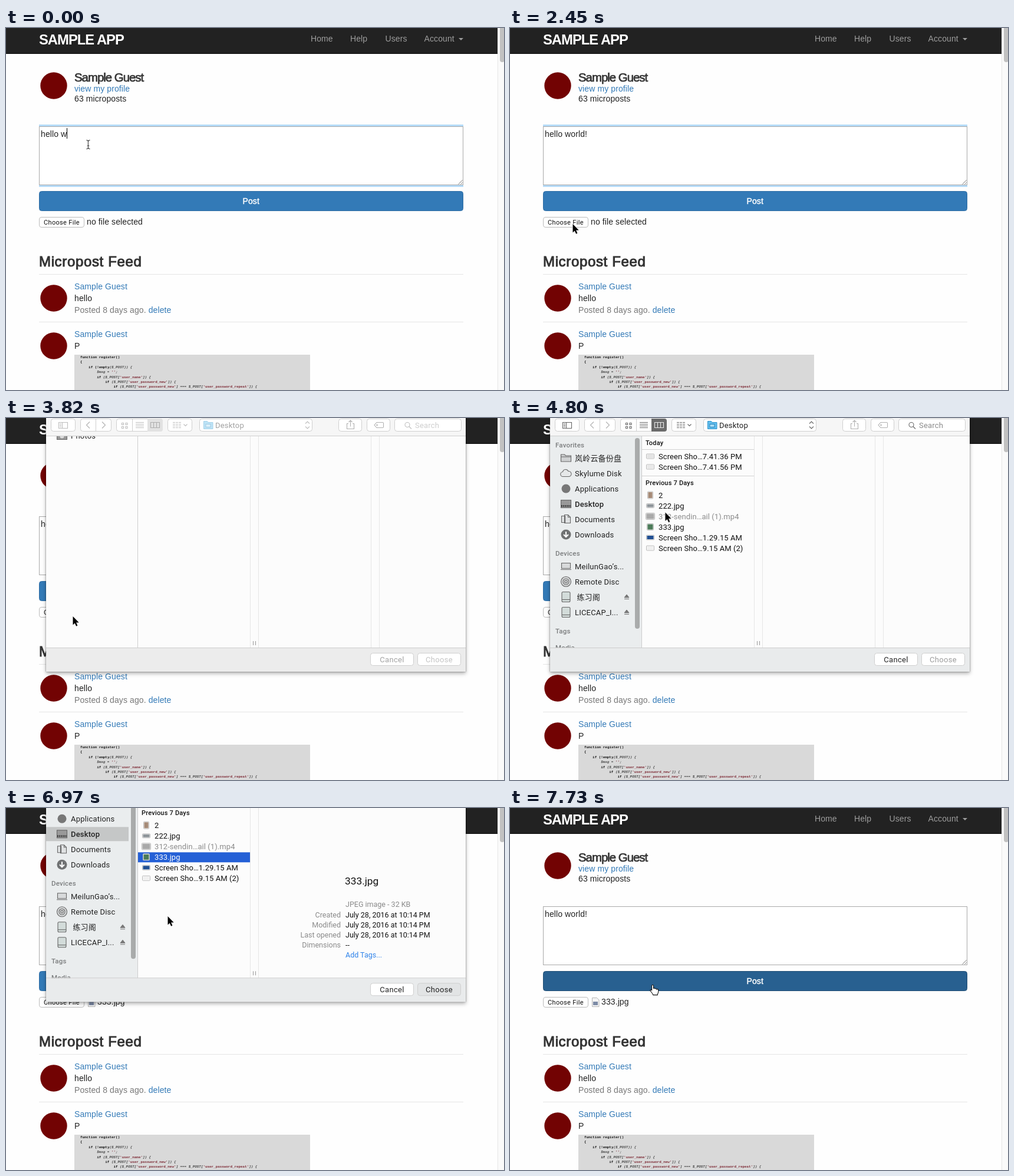
These frames come from a looping animation (845x615 px, 8000 ms). An HTML page:

```html
<!DOCTYPE html>
<html lang="en">
<head>
<meta charset="utf-8">
<title>Micropost upload</title>
<style>
html, body { margin: 0; width: 100%; height: 100%; overflow: hidden; background: #fff; }
svg { display: block; width: 845px; height: 615px; }
text { white-space: pre; }
.page text { font: 14px "Liberation Sans", Arial, sans-serif; letter-spacing: .1px; fill: #222; }
.page .brand { font-size: 23.8px; font-weight: bold; letter-spacing: -1px; fill: #fff; }
.page .nav text { fill: #9d9d9d; }
.page .name { font-size: 20.4px; letter-spacing: -1px; fill: #333; stroke: #333; stroke-width: .7px; }
.page .feed { font-size: 24px; letter-spacing: .65px; fill: #333; stroke: #333; stroke-width: 1px; }
.page .link { fill: #337ab7; }
.page .dim { fill: #777; }
.page .post { fill: #fff; stroke: #fff; stroke-width: .4px; }
.page .btn { font: 11px Roboto, sans-serif; letter-spacing: .33px; fill: #111; }
.page .code text { font: italic bold 5.9px "Liberation Mono", monospace; letter-spacing: 0; fill: #444; }
.code tspan { font-style: normal; fill: #111; }
.code .str { fill: #7d2a35; }

.sheet text { font: 13px Roboto, "Noto Sans CJK SC", sans-serif; letter-spacing: .2px; fill: #222; }
.sheet .files text { letter-spacing: .07px; fill: #111; }
.sheet .files .head, .sheet .side .head { font-size: 11px; font-weight: 500; letter-spacing: .2px; }
.sheet .side .head { font-size: 11.5px; fill: #7b7d7e; }
.sheet .files .off { fill: #8c8c8c; }
.sheet .info text { font-size: 12.5px; letter-spacing: 0; fill: #111; }
.sheet .info .big { font-size: 17.3px; }
.sheet .info .key { fill: #8a8a8a; }
.sheet .info .blue { fill: #2f83ea; }
.sheet .key { text-anchor: end; }
.sheet .label { letter-spacing: .3px; text-anchor: middle; }
.box { fill: #fff; stroke: #cfcfcf; }
.ico { fill: none; stroke: #666; stroke-width: 1.1; }
.faint { opacity: .5; }
.shadow { filter: drop-shadow(0 0 1px rgba(0,0,0,.45)) drop-shadow(0 3px 3px rgba(0,0,0,.3)); }

.step { animation: 8s step-end infinite; }
.type { animation-name: type; }
.caret { animation-name: caret; }
.ring { animation-name: ring; }
.press { animation-name: press; }
.hover { animation-name: hover; }
.empty { animation-name: empty; }
.picked { animation-name: picked; }
.wake { animation-name: wake; }
.view { animation-name: view; }
.cols { animation-name: cols; }
.idle { animation-name: idle; }
.ready { animation-name: ready; }
.select { animation-name: select; }
.preview { animation-name: preview; }
.bar { animation-name: bar; }
.enable { animation-name: enable; }
.sel-text { animation-name: sel-text; }
.push { animation-name: push; }
.beam { animation-name: beam; }
.hand { animation-name: hand; }
.arrow { animation-name: arrow; }
.sheet { animation: slide 8s infinite; }
.cursor { animation: move 8s infinite; }

@keyframes type {
  0% { transform: translateX(103px); }
  1.5% { transform: translateX(111px); }
  2.5% { transform: translateX(116px); }
  7% { transform: translateX(119px); }
  9.125% { transform: translateX(127px); }
  21.125%, 100% { transform: translateX(140px); }
}
@keyframes caret { 0% { visibility: visible; } 15.125%, 100% { visibility: hidden; } }
@keyframes ring { 0% { visibility: visible; } 32.125%, 100% { visibility: hidden; } }
@keyframes press { 0% { fill: #fff; } 32.125% { fill: #dcdcdc; } 32.75%, 100% { fill: #fff; } }
@keyframes hover {
  0%, 28% { fill: #337ab7; stroke: #2e6da4; }
  26.35%, 95.5%, 100% { fill: #286090; stroke: #204d74; }
}
@keyframes empty { 0% { visibility: visible; } 85.625%, 100% { visibility: hidden; } }
@keyframes picked { 0% { visibility: hidden; } 85.625%, 100% { visibility: visible; } }
@keyframes wake { 0% { opacity: .42; } 48.875%, 100% { opacity: 1; } }
@keyframes view { 0% { fill: #e2e2e2; } 48.875%, 100% { fill: #6b6b6b; } }
@keyframes cols { 0% { stroke: #666; } 48.875%, 100% { stroke: #e9e9e9; } }
@keyframes idle { 0% { visibility: visible; } 48.875%, 100% { visibility: hidden; } }
@keyframes ready { 0% { visibility: hidden; } 48.875%, 100% { visibility: visible; } }
@keyframes select { 0% { visibility: hidden; } 82%, 100% { visibility: visible; } }
@keyframes preview { 0% { visibility: hidden; } 83.5%, 100% { visibility: visible; } }
@keyframes bar { 0% { fill: #dadada; } 45.5% { fill: #ececec; } 48.875%, 100% { fill: #e9ebec; } }
@keyframes enable { 0% { fill: #c4c4c4; } 48.875% { fill: #9c9c9c; } 82%, 100% { fill: #222; } }
@keyframes sel-text { 0% { fill: #111; } 82%, 100% { fill: #fff; } }
@keyframes push { 0% { fill: #fff; } 85.625%, 100% { fill: #e2e4e5; } }
@keyframes beam { 0%, 93.125% { visibility: visible; } 26.1%, 95.5%, 100% { visibility: hidden; } }
@keyframes hand { 0%, 28% { visibility: hidden; } 26.1%, 95.5%, 100% { visibility: visible; } }
@keyframes arrow { 0%, 93.125%, 100% { visibility: hidden; } 28% { visibility: visible; } }
@keyframes slide {
  0%, 40.88% { transform: translateY(-455px); animation-timing-function: ease-in-out; }
  45.375%, 85.715% { transform: translateY(0); animation-timing-function: ease-in-out; }
  90.06%, 100% { transform: translateY(-455px); }
}
@keyframes move {
  0%, 21.125% { transform: translate(139.5px, 198px); animation-timing-function: ease-in-out; }
  30.625%, 36.5% { transform: translate(106px, 333px); animation-timing-function: ease-out; }
  41%, 47.75% { transform: translate(113px, 337px); animation-timing-function: ease-in-out; }
  57.125%, 57.875% { transform: translate(233px, 191px); animation-timing-function: ease-in; }
  60.5% { transform: translate(275px, 148px); animation-timing-function: ease-out; }
  62.875%, 68.875% { transform: translate(304px, 159px); animation-timing-function: ease-in-out; }
  73.125%, 75.375% { transform: translate(277px, 150px); animation-timing-function: linear; }
  76.75% { transform: translate(275px, 178px); animation-timing-function: ease-out; }
  79%, 93.125% { transform: translate(274px, 184px); animation-timing-function: ease-in-out; }
  96.625%, 100% { transform: translate(242px, 301px); }
}
</style>
</head>
<body>
<svg viewBox="0 0 845 615" xmlns="http://www.w3.org/2000/svg">
  <g class="page">
    <rect width="845" height="615" fill="#fefefe"/>
    <rect width="834" height="44" fill="#222"/>
    <rect y="43" width="834" height="1" fill="#080808"/>
    <text class="brand" x="56" y="28">SAMPLE APP</text>
    <g class="nav">
      <text x="517" y="23">Home</text>
      <text x="584" y="23">Help</text>
      <text x="643.5" y="23">Users</text>
      <text x="709.5" y="23">Account</text>
      <path d="M768 17h8l-4 4z" fill="#9d9d9d"/>
    </g>
    <rect x="834" width="11" height="615" fill="#fafafa"/>
    <rect x="834" width="1" height="615" fill="#e6e6e6"/>
    <rect x="838" y="-10" width="8" height="68" rx="4" fill="#c1c1c1"/>

    <g fill="#720303">
      <circle cx="81" cy="98" r="22.7"/>
      <circle cx="81" cy="459" r="22.7"/>
      <circle cx="81" cy="540" r="22.7"/>
    </g>
    <text class="name" x="116" y="91">Sample Guest</text>
    <text class="link" x="116" y="108">view my profile</text>
    <text x="116" y="125">63 microposts</text>

    <rect class="step ring" x="56" y="164" width="720" height="106" fill="#b5dbf8"/>
    <rect x="56.5" y="167.5" width="719" height="99" fill="#fff" stroke="#a9a9a9"/>
    <path d="M767.5 265.5l7-7M771.5 265.5l3-3" stroke="#777"/>
    <text x="59" y="185">hello world!</text>
    <g class="step type">
      <rect y="170" width="50" height="18" fill="#fff"/>
      <rect class="step caret" y="170" width="1" height="18" fill="#000"/>
    </g>

    <rect class="step hover" x="56.5" y="277.5" width="719" height="33" rx="4"/>
    <text class="post" x="401.5" y="299">Post</text>
    <rect class="step press" x="56.5" y="321.5" width="76" height="17" rx="3.5" stroke="#bcbcbc"/>
    <text class="btn" x="64" y="334">Choose File</text>
    <text class="step empty" x="137" y="334">no file selected</text>
    <g class="step picked">
      <path d="M139.5 322.5h8l3.5 3.5v11.5h-11.5z" fill="#f4f4f4" stroke="#b5b5b5"/>
      <rect x="141" y="329" width="8" height="6" fill="#7d8ba6"/>
      <text x="155" y="334">333.jpg</text>
    </g>

    <text class="feed" x="56" y="405">Micropost Feed</text>
    <path d="M56 418.5h720M56 499.5h720" stroke="#e5e5e5"/>
    <text class="link" x="116" y="444">Sample Guest</text>
    <text x="116" y="464">hello</text>
    <text class="dim" x="116" y="484">Posted 8 days ago. <tspan class="link">delete</tspan></text>
    <text class="link" x="116" y="525">Sample Guest</text>
    <text x="116" y="545">P</text>
    <rect x="116" y="555" width="400" height="60" fill="#d9d9d9"/>
    <g class="code" id="code"></g>
  </g>

  <g class="sheet">
    <rect class="shadow" x="68" y="-30" width="712" height="461" fill="#f6f6f6"/>
    <rect x="68" y="31" width="712" height="360" fill="#fcfcfc"/>
    <g class="step idle">
      <rect x="86.5" y="26.5" width="17" height="10" fill="#999" stroke="#666"/>
      <circle cx="95" cy="31" r="3.5" fill="#ddd"/>
      <text x="110" y="35">Photos</text>
    </g>
    <g class="step ready">
      <rect x="68" y="31" width="155" height="360" fill="#eaedee"/>
      <rect class="step picked" x="68" y="134" width="140" height="24" fill="#c5c7c7"/>
      <rect x="212" y="34" width="8" height="324" rx="4" fill="#a9abab"/>
      <g class="side" id="side"></g>
      <path d="M224 53.5h190M224 98.5h190" stroke="#d2d2d2"/>
      <rect class="step select" x="224" y="177" width="190" height="17" fill="#2460d6"/>
      <g class="files" id="files"></g>
    </g>
    <path d="M223.5 31v360" stroke="#cdcdcd"/>
    <path d="M414.5 31v360M428.5 31v360M619.5 31v360M633.5 31v360" stroke="#e6e6e6"/>
    <path d="M419.5 379v7M423.5 379v7" stroke="#999"/>
    <g class="step preview">
      <rect x="429" y="31" width="351" height="360" fill="#fcfcfc"/>
      <g class="info" id="info"></g>
    </g>

    <rect x="68" y="-30" width="712" height="60" fill="#f6f6f6"/>
    <path d="M68 30.5h712" stroke="#cfcfcf"/>
    <g class="box">
      <rect x="76.5" y="1.5" width="41" height="21" rx="4"/>
      <rect x="126.5" y="1.5" width="52" height="21" rx="4"/>
      <rect x="187.5" y="1.5" width="78" height="21" rx="4"/>
      <rect x="274.5" y="1.5" width="41" height="21" rx="4"/>
      <rect x="328.5" y="1.5" width="191" height="21" rx="4"/>
      <rect x="564.5" y="1.5" width="39" height="21" rx="4"/>
      <rect x="612.5" y="1.5" width="39" height="21" rx="4"/>
      <rect x="659.5" y="1.5" width="113" height="21" rx="4"/>
      <path d="M152.5 2v20M214.5 2v20"/>
    </g>
    <path class="step view" d="M240 1h22a4 4 0 0 1 4 4v14a4 4 0 0 1-4 4h-22z"/>
    <g class="ico faint">
      <path d="M142 6.5l-5.5 5.5l5.5 5.5M163 6.5l5.5 5.5l-5.5 5.5"/>
      <path d="M581 9.5h-2.5v9h12v-9h-2.5M584.5 14.5v-10M581.5 7l3-3l3 3"/>
      <path d="M629 7.5h10a1.5 1.5 0 0 1 1.5 1.5v6a1.5 1.5 0 0 1-1.5 1.5h-10l-4-4.5z"/>
      <circle cx="629.5" cy="12" r=".8"/>
    </g>
    <g class="step wake">
      <g class="ico">
        <path d="M89.5 7.5h15v10h-15zM95.5 7.5v10M91 10h3M91 12.5h3M91 15h3"/>
        <path d="M196.5 8.5h3v3h-3zM203 8.5h3v3h-3zM196.5 14.5h3v3h-3zM203 14.5h3v3h-3z"/>
        <path d="M220 7.5h14M220 10.5h14M220 13.5h14M220 16.5h14"/>
        <path d="M283 7.5h14M283 10.5h14M283 13.5h14M283 16.5h14" stroke-dasharray="4 1"/>
        <path d="M301.5 10.5l3 3l3-3M508 9.5l3.5-3.5l3.5 3.5M508 14.5l3.5 3.5l3.5-3.5"/>
        <circle cx="681" cy="11.5" r="4"/><path d="M684 14.5l4 4"/>
        <path class="step cols" d="M245.5 7.5h15v9h-15zM250.5 7.5v9M255.5 7.5v9"/>
      </g>
      <path d="M335.5 5.5h6l1.5 2h8v11h-15.5z" fill="#62bdec" stroke="#2c93cc"/>
      <rect x="339" y="10.5" width="8" height="5" fill="#a8dcf5" stroke="#2484bd"/>
      <text x="355" y="17">Desktop</text>
      <text x="694" y="17" style="fill:#8a8a8a">Search</text>
    </g>

    <rect class="step bar" x="68" y="391" width="712" height="40"/>
    <path d="M68 390.5h712" stroke="#cdcdcd"/>
    <rect class="box" x="618.5" y="399.5" width="73" height="21" rx="4"/>
    <rect class="box step push" x="698.5" y="399.5" width="73" height="21" rx="4"/>
    <g class="step wake"><text class="label" x="655" y="415">Cancel</text></g>
    <text class="label step enable" x="735" y="415">Choose</text>
  </g>

  <g class="cursor">
    <path class="step beam" d="M-3-7.5q3 0 3 2q0-2 3-2M0-5.5v11M-3 7.5q3 0 3-2q0 2 3 2M-1.5 2h3" fill="none" stroke="#111"/>
    <path class="step arrow" d="M.5 0v14.5l3.3-3.1l2.3 5.4l2.3-1l-2.3-5.2h4.6z" fill="#000" stroke="#fff" stroke-width="1.8" paint-order="stroke"/>
    <path class="step hand" d="M-1.4 1C-1.4-.9 1.5-.9 1.5 1V6C1.7 4.6 4.2 4.8 4.2 6.4C4.6 5.4 6.9 5.6 6.9 7.2C7.5 6.4 9.8 6.8 9.8 8.4V11C9.8 13 8.3 14 8.3 16.6H.8C.6 14.5-2.5 12-3.8 9.6C-4.6 7.8-2.5 7-1.4 9Z" fill="#fff" stroke="#111" stroke-width="1.1"/>
  </g>
</svg>
<script>
const fill = (id, parts) => document.getElementById(id).innerHTML = parts.join('');
const label = (x, y, s, cls = '') => `<text class="${cls}" x="${x}" y="${y}">${s}</text>`;

// Code picture: indent level and text per line
const lines = [
  [0, '<tspan>function register()</tspan>'],
  [0, '<tspan>{</tspan>'],
  [1, '<tspan>if (!empty</tspan>($_POST)) {'],
  [2, "$msg = '';"],
  [2, "<tspan>if</tspan> ($_POST['user_name']) {"],
  [3, "<tspan>if</tspan> ($_POST['user_password_new']) {"],
  [4, "<tspan>if</tspan> ($_POST['user_password_new'] === $_POST['user_password_repeat']) {"]
];
const tint = s => s.replace(/'[^']*'/g, q => `<tspan class="str">${q}</tspan>`);
fill('code', lines.map(([n, s], i) => label(126 + 14.1 * n, 561 + 8.4 * i, tint(s))));

const icons = {
  folder: '<path d="M-8.5-6h6l2 2h9v10h-17zM-8.5-2h17" fill="#cfd1d2"/>',
  cloud: '<path d="M-5 5.5a4 4 0 0 1-.5-8a5 5 0 0 1 9.5-1a4.5 4.5 0 0 1 1 9z" fill="#e6e8e9"/>',
  dot: '<circle r="7.5" fill="#777" stroke="none"/>',
  desk: '<rect x="-8.5" y="-6.5" width="17" height="13" fill="#999"/><path d="M-8 3.5h16" stroke="#444" stroke-width="3" stroke-dasharray="2 1"/>',
  docs: '<path d="M-7.5-5.5h6v11h-6zM-2.5-7.5h6l4 4v10h-10zM3.5-7.5v4h4" fill="#dfe1e2"/>',
  down: '<circle r="8.5" fill="#707273" stroke="none"/><path d="M0-5v8M-4 0l4 4l4-4" stroke="#fff" stroke-width="2"/>',
  laptop: '<path d="M-7.5-5.5h15v9h-15zM-9 5.5h18" fill="#d8dadb"/>',
  disc: '<circle r="8.5" fill="#d5d7d8"/><circle r="5"/><circle r="2.2"/>',
  drive: '<rect x="-7" y="-8.5" width="14" height="17" rx="2" fill="#d3dcda"/><path d="M-7 4.5h14"/>'
};
const side = [
  [46, 'Favorites'], [68, '岚岭云备份盘', 'folder'], [94, 'Skylume Disk', 'cloud'],
  [120, 'Applications', 'dot'], [146, 'Desktop', 'desk'], [172, 'Documents', 'docs'],
  [198, 'Downloads', 'down'], [230, 'Devices'], [252, 'MeilunGao’s...', 'laptop'],
  [278, 'Remote Disc', 'disc'], [304, ' 练习阁', 'drive', 1], [330, 'LICECAP_I...', 'drive', 1],
  [362, 'Tags'], [390, 'Media']
];
const eject = y => `<path d="M194 ${y + 1}h8l-4-5zM194 ${y + 3.5}h8" fill="#777" stroke="#777"/>`;
fill('side', side.map(([y, s, icon, out]) => icon
  ? `<g class="ico" transform="translate(95 ${y})">${icons[icon]}</g>`
    + `<text x="110" y="${y + 4.6}"${icon === 'desk' ? ' style="font-weight:500"' : ''}>${s}</text>` + (out ? eject(y) : '')
  : label(77, y + 4, s, 'head')));

// Files: row centre, name, thumbnail colour, thumbnail size, text class
const files = [
  [65, 'Screen Sho…7.41.36 PM', '#e4e4e4', 11, 6],
  [83, 'Screen Sho…7.41.56 PM', '#e9e9e9', 11, 6],
  [131, '2', '#a58a76', 7, 10],
  [149, '222.jpg', '#8d9499', 11, 5],
  [167, '312-sendin…ail (1).mp4', '#a9a9a9', 13, 9, 'off'],
  [185, '333.jpg', '#4b7a58', 9, 9, 'step sel-text'],
  [203, 'Screen Sho…1.29.15 AM', '#1f4e92', 11, 6],
  [221, 'Screen Sho…9.15 AM (2)', '#f0f0f0', 11, 6]
];
const thumb = (y, c, w, h) =>
  `<rect x="${237 - w / 2}" y="${y - h / 2}" width="${w + 2}" height="${h + 2}" rx="1" fill="#fff" stroke="#bbb"/>` +
  `<rect x="${238 - w / 2}" y="${y + 1 - h / 2}" width="${w}" height="${h}" fill="${c}"/>`;
fill('files', [
  label(230, 46, 'Today', 'head'),
  label(230, 114, 'Previous 7 Days', 'head'),
  ...files.map(([y, s, c, w, h, cls]) => thumb(y - 1, c, w, h) + label(252, y + 4.6, s, cls))
]);

const when = 'July 28, 2016 at 10:14 PM';
const facts = [['Created', when], ['Modified', when], ['Last opened', when], ['Dimensions', '--']];
fill('info', [
  label(575, 232, '333.jpg', 'big'),
  `<text x="576" y="270" style="fill:#8a8a8a">JPEG image - 32 KB</text>`,
  ...facts.map(([k, v], i) => label(568, 288 + 17 * i, k, 'key') + label(576, 288 + 17 * i, v)),
  label(576, 356, 'Add Tags...', 'blue')
]);
</script>
</body>
</html>
```
